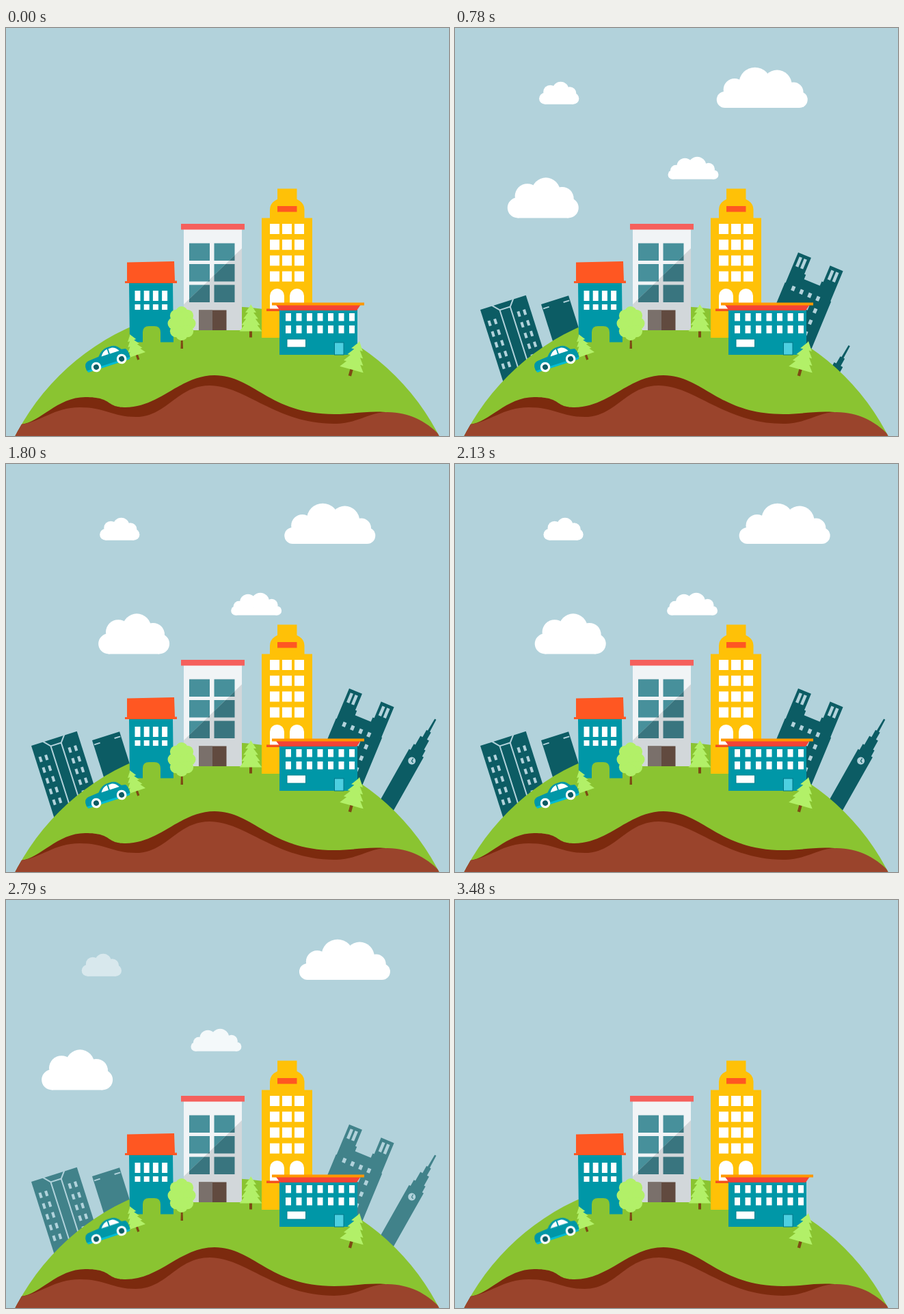
Animation of 648 by 598 pixels, one loop 3.6 s. Source, as an HTML page:

```html
<!DOCTYPE html>
<html lang="en">
<head>
<meta charset="utf-8">
<title>Little city</title>
<style>
html, body { margin: 0; width: 648px; height: 598px; overflow: hidden; background: #b2d2db; }
svg { display: block; }
</style>
</head>
<body>
<svg id="stage" width="648" height="598" viewBox="0 0 648 598"></svg>
<script>
const SKY = '#b2d2db', DARK = '#0c5c64', TEAL = '#0097a7', GREEN = '#8ac431';
const LEAF = '#b2f068', BARK = '#7d4a14', ORANGE = '#ff5722', YELLOW = '#ffc107';
const LOOP = 3600, STEP = 30, LAST = 3480;

// Markup helpers
const times = (n, make) => Array.from({ length: n }, (_, i) => make(i));
const rect = (x, y, w, h, fill, more = '') =>
  `<rect x="${x}" y="${y}" width="${w}" height="${h}" fill="${fill}" ${more}/>`;
const path = (d, fill, more = '') => `<path d="${d}" fill="${fill}" ${more}/>`;
const disc = (x, y, r, fill) => `<circle cx="${x}" cy="${y}" r="${r}" fill="${fill}"/>`;
const group = (transform, body) => `<g transform="${transform}">${body}</g>`;
const clipped = (id, shape, body) =>
  `<clipPath id="${id}">${shape}</clipPath><g clip-path="url(#${id})">${body}</g>`;

// Windows: cols by rows, dx and dy apart
const panes = (x, y, cols, rows, dx, dy, w, h, fill) =>
  times(cols * rows, i => rect(x + i % cols * dx, y + Math.floor(i / cols) * dy, w, h, fill)).join('');

// A cloud is an arch of lobes that swell towards the middle, over a flat base
function cloudArt(count, w, h, small, big) {
  const reach = w / 2 - small;
  const lobes = times(count, i => {
    const u = (i / (count - 1)) ** .9;
    const swell = Math.max(0, Math.sin(Math.PI * u)) ** 1.3;
    return disc(w / 2 - reach * Math.cos(Math.PI * u), h - small - (h - small - big) * swell,
      small + (big - small) * swell ** 2, '#fff');
  });
  return lobes.join('') + rect(small, h - small * 1.7, reach * 2, small * 1.7, '#fff');
}
const roundCloud = cloudArt(5, 104, 59.5, 15, 21);
const wideCloud = cloudArt(6, 133, 60.5, 12, 24);

// Clouds drift between two left edges, turn, and come back by the end
const clouds = [
  { art: roundCloud, size: .56, y: 78.5, from: 107, to: 139.2, turn: 1560, end: 3120, show: 130, hide: 2640 },
  { art: wideCloud, size: 1, y: 56.5, from: 374.7, to: 433.3, turn: 3350, end: LOOP * 2, show: 130, hide: 3150 },
  { art: group('translate(133 0) scale(-1 1)', wideCloud), size: .556, y: 188,
    from: 260, to: 342, turn: 1330, end: 3210, show: 110, hide: 2750 },
  { art: roundCloud, size: 1, y: 219, from: 32, to: 136, turn: 1720, end: 3210, show: 200, hide: 3150 }
];
const FADE_IN = 400, FADE_OUT = 300;

// Dark towers, drawn upright from their top left corner or tip
const slabTower =
  rect(0, 0, 70, 125, DARK) +
  path('M18 -1L27 9V125M51 -1L43 9V125M27 9H43', 'none', `stroke="${SKY}" stroke-width="2"`) +
  [5, 50].map(x => panes(x, 19, 2, 5, 9, 16.5, 4, 8, SKY)).join('');
const blockTower = rect(0, 0, 42, 80, DARK) + panes(1, 6, 2, 1, 31, 0, 9, 2, SKY);
const twinTower =
  path('M0 0H20.500V26H23V33H48V26H50.5V0H71V48H72V150H-1V48H0Z', DARK) +
  [4, 54.5].map(x => panes(x, 5, 2, 1, 7.5, 0, 4.5, 15, SKY)).join('') +
  panes(11, 48, 4, 1, 13, 0, 5, 7, SKY) + panes(40, 66, 2, 3, 13, 18, 5, 7, SKY);
const clockTower =
  path('M-1 0H1.5L2 20H4V32H7.5V47H10V57H12.5V160H-12V57H-9.5V47H-7V32H-3.5V20H-1.5Z', DARK) +
  disc(0, 70, 5.5, SKY) + path('M0 66V70.5L3 71.5', 'none', `stroke="${DARK}" stroke-width="1.2"`);

const towers = [
  { art: slabTower, x: 37, y: 413, turn: -17.6, depth: 125, start: 0 },
  { art: blockTower, x: 126, y: 405, turn: -17.5, depth: 72, start: 60 },
  { art: twinTower, x: 502, y: 329, turn: 22.5, depth: 130, start: 240 },
  { art: clockTower, x: 628, y: 374, turn: 29.4, depth: 162, start: 620 }
];
const RISE = 400, TOWERS_HIDE = 2700;

// Ground
const ball = disc(323.5, 756, 348, GREEN);
const ground = ball + clipped('ball', ball,
  path('M0 584L22 581C50 578 75 541 116 541S145 556 175 556C225 556 255 509 305 509C362 509 385 566 480 566C510 566 525 561 555 563V600H0Z', '#7c2a0e') +
  path('M0 584L22 581C50 578 70 556 108 556S155 570 190 570C235 570 250 524 298 524C350 524 395 580 480 580C515 580 530 563 558 563C598 564 625 582 650 615H0Z', '#9a442c'));

// Trees
function pineArt() {
  const side = times(4, i => [8 + 2.8 * i, 12 + 9.2 * i]);
  const right = side.map(([x, y]) => `L${x} ${y}H${x - 4}`).join('');
  const left = side.reverse().map(([x, y]) => `L${4 - x} ${y}H${-x}L${-x + 6.8} ${y - 9.2}`).join('');
  return rect(-2, 38, 4, 10.5, BARK) + path(`M0 0${right}${left}L0 0Z`, LEAF);
}
const pine = pineArt();
const roundTree =
  path('M255.5 470L256 454H258.5L259 470Z', BARK) +
  `<ellipse cx="257" cy="433" rx="14" ry="18" fill="${LEAF}"/>` +
  times(8, i => disc(257 + 11.5 * Math.sin(i * Math.PI / 4), 433 - 16 * Math.cos(i * Math.PI / 4), 9, LEAF)).join('');

// Buildings
const house =
  path('M180 374L244 373L245 460.5H226V446Q226 437 217 437H209Q200 437 200 446V460.5H181Z', TEAL) +
  path('M177 343.500L246 342L247 370.5H250V374H174V371H177Z', ORANGE) +
  panes(188.5, 385, 4, 1, 13.2, 0, 8, 15, '#fff') + panes(188.5, 405, 4, 1, 13.2, 0, 8, 8, '#fff');

const front = (wall, glass) =>
  rect(260, 295, 85, 148, wall) + panes(268, 315.5, 2, 3, 36.5, 30.5, 30, 25.5, glass);
const office =
  front('#f1f4f6', '#47909b') +
  clipped('shade', '<path d="M345 323L260 405V443H345Z"/>', front('#d2d7da', '#39757f')) +
  rect(256, 287, 93, 8.5, '#f5605c') +
  rect(282, 413.5, 40.5, 29.5, '#614a3f') + rect(282, 413.5, 20, 29.5, '#7a706b');

const arch = x => path(`M${x} 412V392.5a10.5 10.5 0 0 1 21 0V412Z`, '#fff');
const hotel =
  path('M374 278.5H386V266Q386 256 397 251V235.5H425.5V251Q436.5 256 436.5 266V278.5H448V454H374Z', YELLOW) +
  rect(397, 261, 28.5, 8.5, ORANGE) +
  panes(386, 287, 3, 4, 18, 23.2, 14, 15, '#fff') +
  arch(386) + arch(415) + rect(381, 411.5, 24, 3.5, '#f4511e');

const school =
  rect(400, 410, 114, 69, TEAL) +
  path('M395 406H518.5L513 414H401Z', '#f44336') + rect(389, 402.5, 135, 4, '#ff9800') +
  panes(409, 418, 7, 2, 15.5, 18, 8, 11.5, '#fff') +
  rect(411, 456, 27.5, 12, '#fff', 'stroke="#00838f"') +
  rect(480.5, 461, 13.5, 18, '#4dd0e1', 'stroke="#00788a"');

// Car, with the origin on its left wheel
const wheel = x => disc(x, 0, 7.3, '#fff') + disc(x, 0, 4, DARK);
const car =
  path('M-14 0H51V3Q51 4 49 4H-12Q-15 4 -14 0Z', '#00bcd4') +
  path('M-15 1V-5Q-14 -11 -8 -12L8 -13.5Q15 -22 23 -22.5H31Q38 -22 43 -13.5L49 -12.5Q52 -10 52 1Z', TEAL) +
  path('M12 -12.5Q17 -19.5 23 -20V-12.5ZM25 -20H30.5Q35.5 -19 39.5 -12.5H25Z', '#fff') +
  wheel(0) + wheel(39);

const stage = document.getElementById('stage');
stage.innerHTML =
  clouds.map(c => `<g class="cloud">${c.art}</g>`).join('') +
  `<g id="towers">${towers.map(t => `<g class="tower">${t.art}</g>`).join('')}</g>` +
  ground + house + office + group('translate(358 405)', pine) + hotel + school + roundTree +
  group('translate(181 449) rotate(-19) scale(.81)', pine) +
  group('translate(517 459) rotate(15.5) scale(1.09)', pine) +
  group('translate(132 497) rotate(-18)', car);

const cloudNodes = stage.querySelectorAll('.cloud');
const towerNodes = stage.querySelectorAll('.tower');
const skyline = document.getElementById('towers');

// Timing helpers
const ramp = (t, start, length) => Math.min(1, Math.max(0, (t - start) / length));
const ease = (t, start, length) => {
  const u = ramp(t, start, length);
  return u * u * (3 - 2 * u);
};

function draw(t) {
  clouds.forEach((c, i) => {
    const away = ease(t, 0, c.turn) - ease(t, c.turn, c.end - c.turn);
    const x = c.from + (c.to - c.from) * away;
    cloudNodes[i].setAttribute('transform', `translate(${x} ${c.y}) scale(${c.size})`);
    cloudNodes[i].setAttribute('opacity', ramp(t, c.show, FADE_IN) * (1 - ramp(t, c.hide, FADE_OUT)));
  });
  towers.forEach((b, i) => {
    const drop = b.depth * (1 - ease(t, b.start, RISE));
    towerNodes[i].setAttribute('transform', `translate(${b.x} ${b.y}) rotate(${b.turn}) translate(0 ${drop})`);
  });
  skyline.setAttribute('opacity', 1 - ramp(t, TOWERS_HIDE, 280));
}

const start = performance.now();
function tick() {
  const t = (performance.now() - start) % LOOP;
  draw(Math.min(LAST, Math.floor(t / STEP) * STEP));
  requestAnimationFrame(tick);
}
tick();
</script>
</body>
</html>
```
